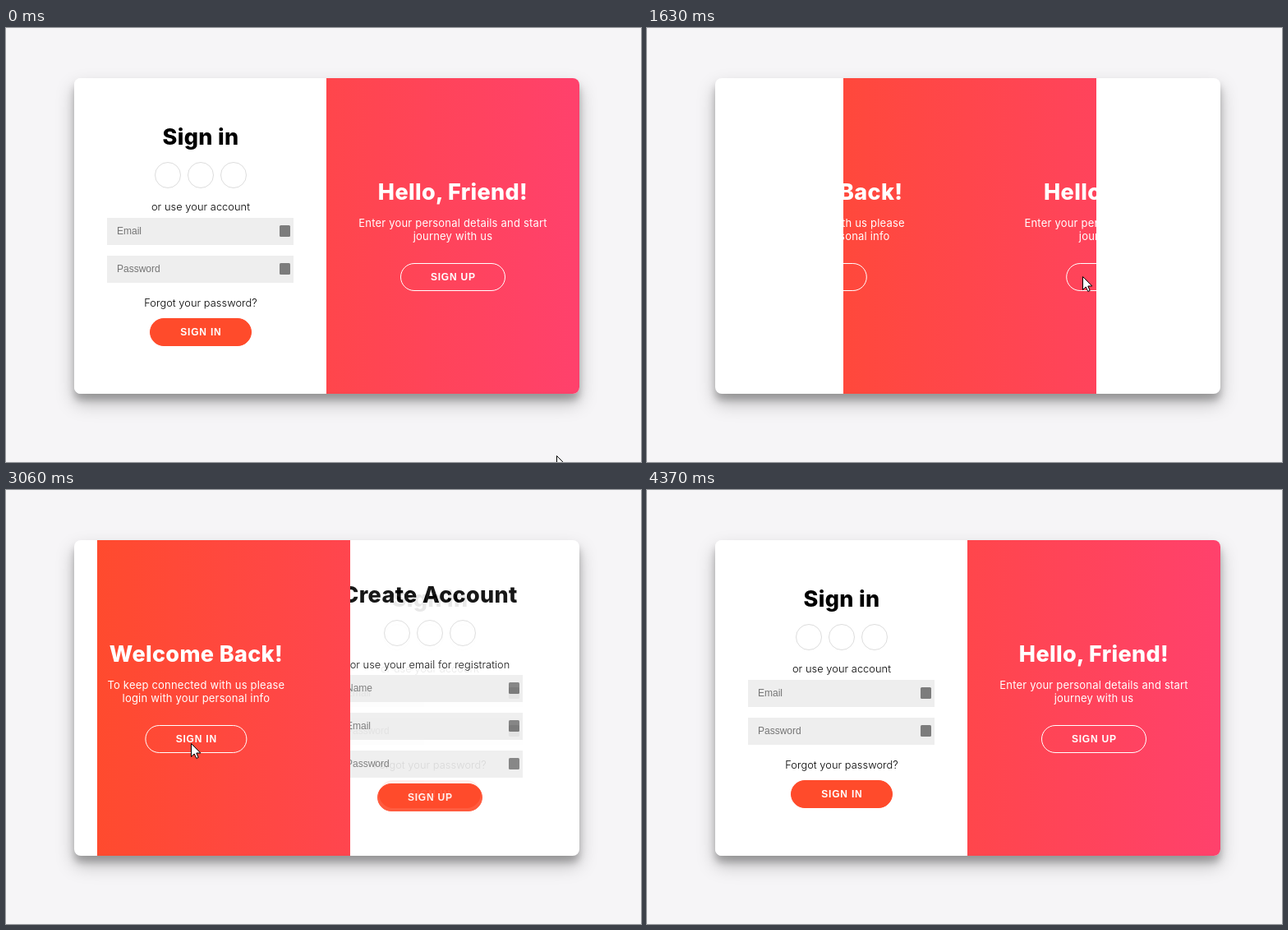
An HTML page for the animation above (5030 ms loop, 773 px wide and 528 px high).

```html
<!DOCTYPE html>
<html lang="en">
<head>
<meta charset="utf-8">
<title>Sign in and sign up slider</title>
<style>
  html, body { margin: 0; width: 100%; height: 100%; overflow: hidden; background: #f6f5f7; }
  .card {
    position: absolute; left: 83px; top: 61px; width: 615px; height: 384px;
    border-radius: 8px; background: #fff;
    box-shadow: 0 11.2px 22.4px rgba(0,0,0,.25), 0 8px 8px rgba(0,0,0,.22);
  }
  svg { position: absolute; left: 0; top: 0; }
  text { font: 12.8px Inter, sans-serif; text-anchor: middle; }
  .title { font-size: 27px; font-weight: 800; letter-spacing: .35px; }
  .note { font-weight: 300; letter-spacing: .06px; }
  .lead { font-size: 13px; letter-spacing: .2px; }
  .hint { font: 12px "Liberation Sans", Arial, sans-serif; text-anchor: start; fill: #757575; }
  .label { font: bold 12px "Liberation Sans", Arial, sans-serif; letter-spacing: .8px; fill: #fff; }
  .button { transform-box: fill-box; transform-origin: center; }
</style>
</head>
<body>
<div class="card"></div>
<svg width="773" height="528" viewBox="0 0 773 528">
  <defs>
    <linearGradient id="heat">
      <stop stop-color="#ff4b2b"/><stop offset="1" stop-color="#ff416c"/>
    </linearGradient>
    <clipPath id="cardClip"><rect x="83" y="61" width="615" height="384" rx="8"/></clipPath>
    <clipPath id="panelClip"><rect id="pane" y="61" width="308" height="384"/></clipPath>
  </defs>
  <g clip-path="url(#cardClip)">
    <g id="signIn"></g>
    <g id="signUp"></g>
    <g clip-path="url(#panelClip)">
      <rect x="83" y="61" width="615" height="384" fill="url(#heat)"/>
      <g id="welcome" fill="#fff"></g>
      <g id="hello" fill="#fff"></g>
    </g>
  </g>
  <circle id="spot" r="12.5" fill="#ffdc00" fill-opacity=".6"/>
  <path id="arrow" d="M.5 .5V16.5L4.2 13L6.8 18.5L9.2 17.4L6.8 12H11.8Z" fill="#fff" stroke="#000"/>
  <path id="beam" d="M-3 -6.5H-1L0 -6L1 -6.5H3M0 -6V6M-3 6.5H-1L0 6L1 6.5H3" fill="none" stroke="#000" stroke-width="1.2"/>
</svg>
<script>
const $ = id => document.getElementById(id);
const LOOP = 5030, HALF = 307, LEFT = 237, RIGHT = LEFT + HALF;

const text = (cls, x, y, s) => `<text class="${cls}" x="${x}" y="${y}">${s}</text>`;

const button = (x, y, width, s, paint) => `<g class="button">
  <rect x="${x - width / 2 + .5}" y="${y - 16.5}" width="${width - 1}" height="33" rx="16.5" ${paint}/>
  ${text('label', x + .4, y + 4, s)}</g>`;
const solid = 'fill="#ff4b2b" stroke="#ff4b2b"', ghost = 'fill="none" stroke="#fff"';

const field = (y, s) => `<rect x="123" y="${y}" width="227" height="33" fill="#eee"/>
  ${text('hint', 135, y + 20, s)}
  <rect class="badge" x="333" y="${y + 9}" width="13" height="14" rx="1.5" fill="#7c7c7c"/>`;

const form = (title, y, note, fields, rest) =>
  `<rect x="83" y="61" width="${HALF + 1}" height="384" fill="#fff"/>` +
  text('title', LEFT, y, title) +
  [-40, 0, 40].map(dx => `<circle cx="${LEFT + dx}" cy="${y + 37}" r="15.5" fill="none" stroke="#ddd"/>`).join('') +
  text('note', LEFT, y + 80, note) +
  fields.map((s, i) => field(y + 89 - y % 2 + 46 * i, s)).join('') + rest;

const side = (x, title, line1, line2, btn) =>
  text('title', x, 209, title) + text('lead', x, 242, line1) + text('lead', x, 258, line2) + btn;

$('signIn').innerHTML = form('Sign in', 142, 'or use your account', ['Email', 'Password'],
  text('note', LEFT, 339, 'Forgot your password?') + button(LEFT, 370, 124, 'SIGN IN', solid));
$('signUp').innerHTML = form('Create Account', 137, 'or use your email for registration',
  ['Name', 'Email', 'Password'], button(LEFT, 374, 128, 'SIGN UP', solid));
$('welcome').innerHTML = side(LEFT, 'Welcome Back!', 'To keep connected with us please',
  'login with your personal info', button(LEFT, 303, 124, 'SIGN IN', ghost));
$('hello').innerHTML = side(RIGHT, 'Hello, Friend!', 'Enter your personal details and start',
  'journey with us', button(RIGHT, 303, 128, 'SIGN UP', ghost));

const upPress = $('hello').querySelector('.button');
const inPress = $('welcome').querySelector('.button');
const emailBadge = $('signUp').querySelectorAll('.badge')[1];

const clamp = v => Math.min(1, Math.max(0, v));

// Pointer strokes, each slowing to its end.
const strokes = [
  { from: 0, to: 320, x: 302, y: 400 },
  { from: 320, to: 530, x: 483, y: 325 },
  { from: 530, to: 850, x: 530, y: 302 },
  { from: 1640, to: 1958, x: 460, y: 298 },
  { from: 1958, to: 2310, x: 225, y: 308 },
  { from: 3300, to: 3820, x: 543, y: 295 },
  { from: 3940, to: 4365, x: 715, y: 540 },
];

function pointer(t) {
  let x = 670, y = 520;
  for (const s of strokes) {
    const k = 1 - (1 - clamp((t - s.from) / (s.to - s.from))) ** 2;
    x += (s.x - x) * k;
    y += (s.y - y) * k;
  }
  return [Math.round(x), Math.round(y)];
}

// cubic-bezier(.42, 0, .58, 1)
function easeInOut(x) {
  let lo = 0, hi = 1, s = .5;
  for (let i = 0; i < 24; i++) {
    const r = 1 - s;
    if (1.26 * s * r * r + 1.74 * s * s * r + s ** 3 < x) lo = s; else hi = s;
    s = (lo + hi) / 2;
  }
  return s * s * (3 - 2 * s);
}

const clicks = [{ down: 1130, up: 1332 }, { down: 2780, up: 2929 }];
const press = (t, { down, up }) => 1 - .05 * (clamp((t - down) / 80) - clamp((t - up) / 80));
const move = (id, x, y = 0) => $(id).setAttribute('transform', `translate(${x} ${y})`);
const show = (id, on) => $(id).setAttribute('opacity', +on);

function draw(t) {
  const [open, close] = clicks.map(c => clamp((t - c.up) / 600));
  const back = easeInOut(close), p = close > 0 ? 1 - back : easeInOut(open);
  const shift = Math.round(HALF * p);

  $('pane').setAttribute('x', 83 + HALF - shift);
  move('welcome', -.2 * (HALF - shift));
  move('hello', .2 * shift);
  move('signIn', shift);
  move('signUp', shift);
  // Fades while leaving and drops below the other form at 5/8 of the way.
  show('signUp', close > 0 ? (back < .625 ? 1 - back : 0) : open >= .5);

  upPress.style.transform = `scale(${press(t, clicks[0])})`;
  inPress.style.transform = `scale(${press(t, clicks[1])})`;

  const [x, y] = pointer(t);
  const hover = open === 1 && close === 0 && x > 430 && y > 272 && y < 305;
  emailBadge.setAttribute('fill', hover ? '#000' : '#7c7c7c');
  move('arrow', x, y);
  move('beam', x + .5, y + .5);
  move('spot', x + .5, y + .5);
  show('arrow', !hover);
  show('beam', hover);
  show('spot', clicks.some(c => t >= c.down && t < c.up));
}

// The picture advances at a steady rate of about nine steps a second.
const STEP = 109.7, start = performance.now();
function loop() {
  const t = (performance.now() - start) % LOOP;
  draw(Math.floor((t + 32) / STEP) * STEP - 16);
  requestAnimationFrame(loop);
}
loop();
</script>
</body>
</html>
```
